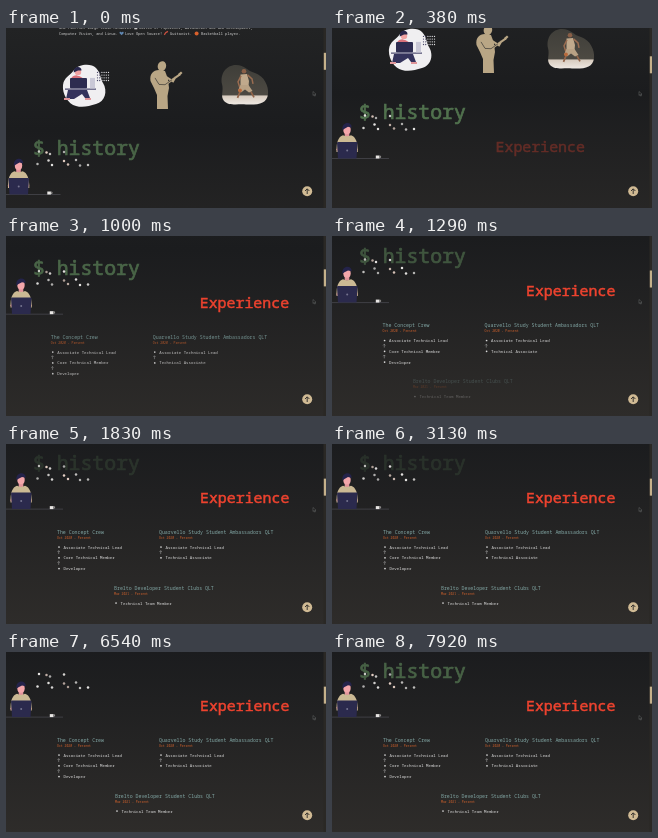
Write an HTML page that moves like this. It is 320 px wide and 180 px high and loops after 8000 ms.

```html
<!DOCTYPE html>
<html lang="en">
<head>
<meta charset="utf-8">
<title>History</title>
<style>
html, body { margin: 0; width: 100%; height: 100%; overflow: hidden; background: #1d1d1e; }
svg { display: block; width: 100vw; height: 100vh; }
text { font-family: "Noto Sans Mono", "DejaVu Sans Mono", monospace; }
.bio { font-size: 3.65px; fill: #d2d2d2; }
.title { font-size: 19.8px; fill: #52734f; stroke: #52734f; stroke-width: .7px; }
.sub { font-size: 14.9px; fill: #ee432f; stroke: #ee432f; stroke-width: .5px; }
.org { font-size: 4.9px; fill: #83a8a6; }
.date { font-size: 3.15px; fill: #d2622c; }
.item { font-size: 4.07px; fill: #dedede; }
</style>
</head>
<body>
<svg viewBox="0 0 320 180" preserveAspectRatio="none">
  <defs>
    <linearGradient id="bg" x1="0" y1="0" x2="0" y2="1">
      <stop offset="0" stop-color="#222324"/>
      <stop offset=".36" stop-color="#1b1c1e"/>
      <stop offset="1" stop-color="#2e2c2a"/>
    </linearGradient>
    <linearGradient id="court" x1="0" y1="0" x2="0" y2="1">
      <stop offset="0" stop-color="#3f3e39"/>
      <stop offset=".75" stop-color="#4c4942"/>
      <stop offset=".79" stop-color="#d9cdc0"/>
      <stop offset="1" stop-color="#eee8e2"/>
    </linearGradient>
  </defs>

  <g id="page">
    <rect width="320" height="282" fill="url(#bg)"/>
    <g class="bio">
      <text x="53" y="1.3">and fine-set large scale networks.</text>
      <rect x="128.3" y="-1.6" width="3" height="3" fill="#c9c9c9"/>
      <text x="133" y="1.3">Master of Pipelines, Automation and Web Development,</text>
      <text x="53" y="7">Computer Vision, and Linux.</text>
      <path d="M115.6 7.4l-2-2.1c-.6-1.6 1.4-2.2 2-.7c.6-1.5 2.6-.9 2 .7z" fill="#5f86b0"/>
      <text x="119" y="7">Love Open Source!</text>
      <path d="M158.3 7l1.4-2.2 2.2-1.3" stroke="#c9503f" stroke-width="1.3" fill="none"/>
      <text x="164" y="7">Guitarist.</text>
      <circle cx="190.6" cy="5.7" r="2" fill="#d8602c"/>
      <text x="195" y="7">Basketball player.</text>
    </g>

    <!-- desk worker -->
    <g>
      <path d="M57 57C58 49 64 48 68 42C73 36 85 35 90 40C95 45 94 50 97 55C102 63 99 74 90 76C83 78 77 80 70 78C62 76 56 66 57 57Z" fill="#f0eff1"/>
      <path d="M64 54Q65 47 71 47.500T80 55Z" fill="#d8717b"/>
      <circle cx="72" cy="44" r="3.2" fill="#f0a3a3"/>
      <path d="M67.800 44.500C67 37.500 76 37.500 75.500 42.500H72Z" fill="#27264a"/>
      <rect x="64" y="50" width="17" height="10.500" rx="1" fill="#2d2c50"/>
      <path d="M59 60.500h31v1.500H59z" fill="#6a6987"/>
      <path d="M62 62h19l3 8h-5l-3-4-8 5h-8z" fill="#34335c"/>
      <path d="M58 70h6v2.200h-6zM79 70h6v2.200h-6z" fill="#e0969a"/>
      <path d="M84 50h5v10.500h-5z" fill="#c9c8d6"/>
      <g id="grid"></g>
    </g>

    <!-- guitarist -->
    <g fill="#b9a685">
      <ellipse cx="156" cy="38.300" rx="4.200" ry="5" transform="rotate(15 156 38)"/>
      <path d="M153 42C147 42 143.500 46 144.500 53L148 60 151 67 151 81H162L161.500 68 163 60 162 51 159 43Z"/>
      <path d="M149 57Q155 51 161 56Q162 63 153 64Z"/>
      <path d="M159 57L174 46.500M160 49L167 53.500 169.500 49" stroke="#b9a685" stroke-width="2" fill="none"/>
      <path d="M172 46l3-2.500 1.500 1.500-3 3z"/>
      <path d="M149 50l4 6.500 6 .3 7-5" stroke="#232425" stroke-width=".6" fill="none"/>
    </g>

    <!-- ball player -->
    <g>
      <path d="M216 56C214 46 220 37 230 37C239 37 241 43 249 45C258 48 263 58 262 66C261 76 252 77 240 76.500C230 76 223 78 218 73C214 68 218 63 216 56Z" fill="url(#court)"/>
      <circle cx="238" cy="43.300" r="2.300" fill="#8a5f47"/>
      <path d="M234.500 46.500l6.500-.5 2 7-.5 5h-8z" fill="#c0a98c"/>
      <path d="M235 48l-3 6 2 6M241.500 47l4.500 4 1 5" stroke="#9a6c50" stroke-width="1.500" fill="none"/>
      <path d="M234.500 57h8l4 6-3.500 1.500-4-3-4 3-3-2z" fill="#b8a184"/>
      <path d="M234 64l-2.500 6M245 64l3 5.500" stroke="#916449" stroke-width="1.700"/>
      <circle cx="234" cy="62.500" r="1.900" fill="#b8683a"/>
    </g>

    <text id="title" class="title" x="27" y="127.500">$ history</text>

    <!-- coder -->
    <g id="coder">
      <path d="M0 166.600h57" stroke="#47474d" stroke-width=".8"/>
      <g id="head">
        <rect x="12.700" y="139" width="4.600" height="6" fill="#e2949a"/>
        <ellipse cx="15" cy="137.500" rx="3.700" ry="4.500" fill="#f3a6aa"/>
        <path d="M10.500 138C9 129.500 20 128.500 19.700 135.500L16 134.700 12.500 136.500Z" fill="#24234a"/>
      </g>
      <path d="M4.500 160Q4 145.500 11 143.300Q15 145.500 19 143.300Q26 145.500 25.800 160Z" fill="#cbb994"/>
      <path id="arms" d="M5 157l5 6M25 157l-5 6" stroke="#e2a09c" stroke-width="2"/>
      <path d="M6 150h18.500q1 0 1 1l-1 15.500H6L5 151q0-1 1-1z" fill="#2b2a4d"/>
      <circle cx="15.200" cy="158.500" r="1" fill="#75748f"/>
      <path d="M43.800 163.600h3.600v3h-3.600z" fill="#e8e6e4"/>
      <path d="M47.400 164.200h1.200v1.400h-1.200" stroke="#e8e6e4" stroke-width=".5" fill="none"/>
    </g>
    <g id="dots"></g>

    <text id="sub" class="sub" x="194" y="160.500">Experience</text>
    <g id="jobs"></g>
  </g>

  <rect x="317.500" width="2.500" height="180" fill="#2a2825"/>
  <rect id="thumb" x="317.800" width="2.200" height="17" fill="#c5b18b"/>
  <circle cx="301.200" cy="163.200" r="5" fill="#d0ba94"/>
  <path d="M301.200 166v-5M299 163l2.200-2.200 2.200 2.200" stroke="#2a2826" stroke-width=".9" fill="none"/>
  <path d="M307 63.500v4l1-.9.700 1.500.7-.3-.7-1.500h1.300z" fill="#161616" stroke="#8d9092" stroke-width=".35"/>
</svg>
<script>
const LOOP = 8000;
const TURN = 2 * Math.PI;
const $ = id => document.getElementById(id);

function add(parent, tag, attrs, content) {
  const el = document.createElementNS("http://www.w3.org/2000/svg", tag);
  for (const k in attrs) el.setAttribute(k, attrs[k]);
  if (content) el.textContent = content;
  parent.appendChild(el);
  return el;
}

for (let i = 0; i < 24; i++) {
  const col = i % 6;
  add($("grid"), "circle", { cx: 91.5 + col * 2.2, cy: 44.5 + Math.floor(i / 6) * 2.7, r: .65,
    fill: col < 2 ? "#4a4968" : "#dddce0" });
}

const dots = [[33, 123.5], [40.5, 124.5], [44, 126], [58, 124], [42.500, 132.500], [58, 133],
  [70, 132], [31.5, 136], [46, 137], [62, 136.5], [74, 137.5], [82, 137]]
  .map(([cx, cy], i) => add($("dots"), "circle",
    { cx, cy, r: 1.25, fill: i % 4 == 1 ? "#e5cfc4" : "#e6e4e2" }));

function job(x, y, start, name, date, items) {
  const g = add($("jobs"), "g", {});
  add(g, "text", { x, y, class: "org" }, name);
  add(g, "text", { x, y: y + 5, class: "date" }, date);
  items.forEach((s, i) => {
    const row = y + 14.5 + i * 10.8;
    add(g, "circle", { cx: x + 2, cy: row - 1.5, r: .85, fill: "#dedede" });
    add(g, "text", { x: x + 6.5, y: row, class: "item" }, s);
    if (i < items.length - 1) add(g, "path", { d: `M${x + 1.7} ${row + 5.6}v-3.4m-1.2 1.2l1.2-1.2 1.2 1.2`,
      stroke: "#b0b0b0", "stroke-width": .5, fill: "none" });
  });
  return { el: g, start, dist: 40 };
}

const reveals = [
  { el: $("sub"), start: 190, dist: 45 },
  job(51, 191.5, 510, "The Concept Crew", "Oct 2020 - Present",
    ["Associate Technical Lead", "Core Technical Member", "Developer"]),
  job(153, 191.5, 510, "Quarvello Study Student Ambassadors QLT", "Oct 2020 - Present",
    ["Associate Technical Lead", "Technical Associate"]),
  job(109, 247.5, 1110, "Brelto Developer Student Clubs QLT", "Mar 2021 - Present",
    ["Technical Team Member"])
];

// cubic-bezier(.25, .1, .25, 1)
function ease(x) {
  if (x <= 0) return 0;
  if (x >= 1) return 1;
  const bez = (a, b, u) => 3 * a * u * (1 - u) ** 2 + 3 * b * u * u * (1 - u) + u ** 3;
  let lo = 0, hi = 1;
  for (let i = 0; i < 24; i++) {
    const mid = (lo + hi) / 2;
    if (bez(.25, .25, mid) < x) lo = mid; else hi = mid;
  }
  return bez(.1, 1, lo);
}

// time, offset, speed per ms
const path = [[0, 0, .092], [380, 36, .094], [750, 70, .08], [1290, 100, .012], [1670, 101.5, 0]];

function scrollAt(t) {
  for (let i = 1; i < path.length; i++) {
    const [t0, y0, v0] = path[i - 1], [t1, y1, v1] = path[i];
    if (t > t1) continue;
    const d = t1 - t0, u = (t - t0) / d, w = 1 - u;
    return y0 * (1 + 2 * u) * w * w + v0 * d * u * w * w
      + y1 * u * u * (3 - 2 * u) - v1 * d * u * u * w;
  }
  return 101.5;
}

function draw(t) {
  const y = scrollAt(t);
  $("page").setAttribute("transform", `translate(0 ${-y})`);
  $("thumb").setAttribute("y", 24.8 + y * .097);
  $("title").setAttribute("opacity", .5 + .5 * Math.cos((t - 500) / 4000 * TURN));

  $("coder").setAttribute("transform", `translate(${-2.5 * (1 - ease(t / 400))} 0)`);
  $("head").setAttribute("transform", `translate(0 ${.25 * Math.sin(t / 2000 * TURN)})`);
  $("arms").setAttribute("transform", `translate(0 ${.3 * Math.sin(t / 400 * TURN)})`);
  dots.forEach((d, i) =>
    d.setAttribute("opacity", .85 + .15 * Math.sin(t / 2000 * TURN + i * 1.7)));

  for (const { el, start, dist } of reveals) {
    const p = ease((t - start) / 900);
    el.setAttribute("opacity", p);
    el.setAttribute("transform", `translate(${-dist * (1 - p)} 0)`);
  }
}

function tick() {
  draw(performance.now() % LOOP);
  requestAnimationFrame(tick);
}
tick();
</script>
</body>
</html>
```
